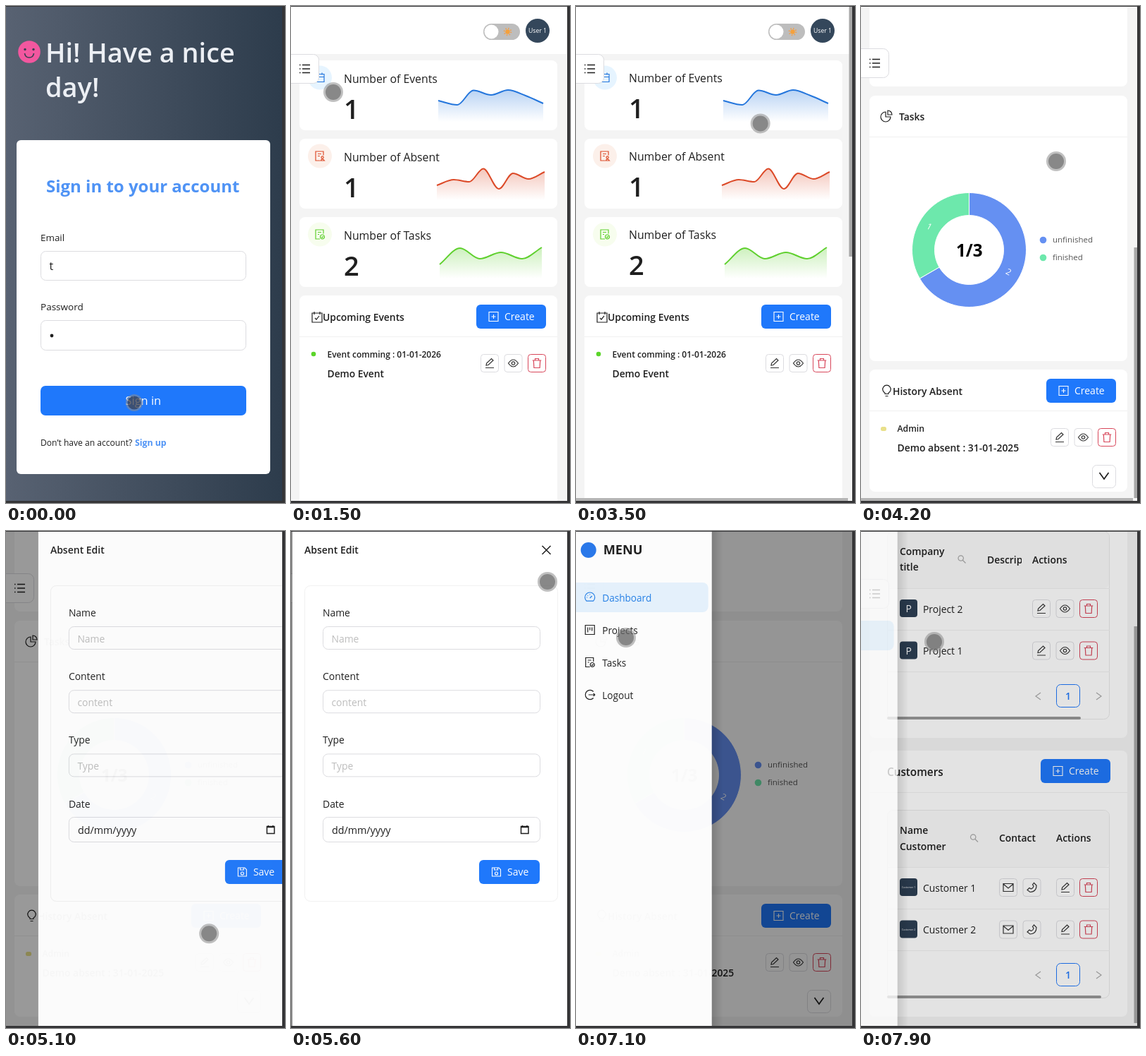
Recreate the animation shown at these times as an HTML page. Size 396x704 px, loop 8 s.

```html
<!DOCTYPE html>
<html lang="en">
<head>
<meta charset="utf-8">
<title>Dashboard walkthrough</title>
<style>
html, body { margin: 0; width: 100%; height: 100%; overflow: hidden; background: #353537; }
svg { display: block; width: 396px; height: 704px; font-family: "Open Sans", "Noto Sans", sans-serif; }
text { white-space: pre; }
</style>
</head>
<body>
<svg id="stage" viewBox="0 0 396 704"></svg>
<script>
const BLUE = '#1f78fb', INK = '#1f1f1f', RED = '#d8465a', LINE = '#dcdce0';

const ICONS = {
  calendar: 'M-6-5h12v11h-12zM-6-1h12M-3-7v3M3-7v3',
  check: 'M-7-6h14v13h-14zM-4-8v4M4-8v4M-3 1l2 2 4-5',
  absent: 'M5-1V-6.5H-6V6.5H0M-3-3h5M-3 0h3M1 6.5q2.5-4 5.5 0zM2 2a1.6 1.6 0 1 0 3.2 0a1.6 1.6 0 1 0-3.2 0',
  task: 'M5-1V-6.5H-6V6.5H0M-3-3h5M-3 0h2M.5 3.5a3 3 0 1 0 6 0a3 3 0 1 0-6 0M2.3 3.5l1 1 1.6-2',
  plus: 'M-6.5-6.5h13v13h-13zM-3 0h6M0-3v6',
  pencil: 'M-6 6.5h12M-5 3l.6-3L2.5-6.5 5-4-2 2.5z',
  eye: 'M-7 0Q0-10 7 0Q0 10-7 0zM-2.2 0a2.2 2.2 0 1 0 4.4 0a2.2 2.2 0 1 0-4.4 0',
  trash: 'M-6.3-4h12.6M-2.5-4v-2.5h5v2.5M-4.7-4l.6 10.5h8.2l.6-10.5',
  list: 'M-7.5-5.5h1.5M-3.5-5.5h11M-7.5 0h1.5M-3.5 0h11M-7.5 5.5h1.5M-3.5 5.5h11',
  pie: 'M-1-6a7 7 0 1 0 7 7h-7zM2-8a6 6 0 0 1 6 6h-6z',
  bulb: 'M-2.5 4.5v-1.5a5.7 5.7 0 1 1 5 0v1.5zM-2 7.5h4',
  down: 'M-6.5-4.5L0 4.5 6.5-4.5',
  close: 'M-6-6L6 6M6-6L-6 6',
  save: 'M-6-6h9.5l2.5 2.5v9.5h-12zM-3-6v3h5v-3M-2 2a2 2 0 1 0 4 0a2 2 0 1 0-4 0',
  gauge: 'M-4.7 5.2a7 7 0 1 1 9.4 0zM0 1l3-3M-4.5 0h1M0-4.5v1M-3.2-3l.6.6',
  board: 'M-6.5-6.5h13v13h-13zM-3-3.5v7M0-3.5v4M3-3.5v5',
  logout: 'M5-4.5a6.6 6.6 0 1 0 0 9M-2 0h9M5-2l2 2-2 2',
  mail: 'M-7-5.5h14v11h-14zM-7-5L0 1 7-5',
  phone: 'M3-6.5l3.5 3.5q0 9-9 9.5l-4-3 3-3 2.5 1.5q3-1 3.5-4l-1.5-2z',
  search: 'M-5-1.5a3.7 3.7 0 1 0 7.4 0a3.7 3.7 0 1 0-7.4 0M1.5 1.5L5.5 5.5',
  prev: 'M3-5L-4 0 3 5',
  next: 'M-3-5L4 0-3 5',
  date: 'M-5-4.5h10.5v10h-10.5zM-5-3.5h10.5M-3-6v2M3.5-6v2'
};

const rect = (x, y, w, h, fill, r = 0, stroke = 'none') =>
  `<rect x="${x}" y="${y}" width="${w}" height="${h}" rx="${r}" fill="${fill}" stroke="${stroke}"/>`;
const box = (x, y, w, h, r = 6, stroke = LINE) => rect(x + .5, y + .5, w - 1, h - 1, '#fff', r, stroke);
const disc = (x, y, r, fill) => `<circle cx="${x}" cy="${y}" r="${r}" fill="${fill}"/>`;
const text = (x, y, str, size = 13.9, fill = INK, weight = 400, extra = '') =>
  `<text x="${x}" y="${y}" font-size="${size}" fill="${fill}" font-weight="${weight}" ${extra}>${str}</text>`;
const bold = (x, y, str, size = 13.9, fill = INK) => text(x, y, str, size, fill, 600);
const icon = (name, x, y, color = INK, width = 1.2) =>
  `<path transform="translate(${x} ${y})" d="${ICONS[name]}" fill="none" stroke="${color}" stroke-width="${width}"/>`;
const iconButton = (name, x, y, color = '#333') =>
  box(x - 13, y - 13, 26, 26, 4, color === RED ? RED : LINE) + icon(name, x, y, color);
const actions = (y, xs = [282, 315.5, 349]) =>
  iconButton('pencil', xs[0], y) + iconButton('eye', xs[1], y) + iconButton('trash', xs[2], y, RED);
const button = (x, y, w, label, name) =>
  rect(x, y, w, 34, BLUE, 6) + icon(name, x + 24.5, y + 17, '#fff', 1.1) + text(x + 40, y + 22, label, 14, '#fff');
const card = (y, h) => rect(12, y, 366, h, '#fff', 8);
const rule = (x, y, w) => rect(x, y, w, 1, '#f0f0f0');

// Smooth curve: flat at peaks and dips, sloped elsewhere
function curve(p) {
  const slope = (a, b) => (b[1] - a[1]) / (b[0] - a[0]);
  const m = p.map((q, i) => {
    const a = p[i - 1] || q, b = p[i + 1] || q;
    return p[i - 1] && p[i + 1] && (q[1] - a[1]) * (b[1] - q[1]) <= 0 ? 0 : slope(a, b);
  });
  return p.slice(1).reduce((d, q, i) => {
    const a = p[i], h = (q[0] - a[0]) / 3;
    return d + `C${a[0] + h} ${a[1] + h * m[i]} ${q[0] - h} ${q[1] - h * m[i + 1]} ${q}`;
  }, 'M' + p[0]);
}

function statCard(i, label, value, name, color, tint, points) {
  const y = 77 + 111 * i, d = curve(points), base = y + 87;
  return card(y, 99) + disc(41, y + 24.5, 17, tint) + icon(name, 41, y + 24.5, color) +
    text(75, y + 31.5, label, 15.8) + bold(75, y + 82.5, value, 38) +
    `<linearGradient id="fade${i}" x2="0" y2="1"><stop stop-color="${color}" stop-opacity=".32"/>
     <stop offset="1" stop-color="${color}" stop-opacity="0"/></linearGradient>
     <g clip-path="url(#reveal)"><path d="${d}V${base}H${points[0][0]}Z" fill="url(#fade${i})"/>
     <path d="${d}" fill="none" stroke="${color}" stroke-width="2"/></g>`;
}

function ring(from, to, fill) {
  const at = (r, deg) => {
    const a = deg * Math.PI / 180;
    return [153.5 + r * Math.sin(a), 345.5 - r * Math.cos(a)];
  };
  const big = to - from > 180 ? 1 : 0;
  return `<path d="M${at(81, from)}A81 81 0 ${big} 1 ${at(81, to)}L${at(49, to)}A49 49 0 ${big} 0 ${at(49, from)}Z" fill="${fill}" stroke="#fff"/>`;
}

const field = (x, y, w, h) => box(x, y, w, h, 7);

const login = () =>
  rect(0, 0, 392, 704, 'url(#night)') + disc(33, 65, 15.8, '#f2579f') +
  disc(27, 61.5, 1.7, '#3a3f52') + disc(39, 61.5, 1.7, '#3a3f52') +
  '<path d="M26.5 67q.8 6 6.5 6t6.5-6" fill="none" stroke="#3a3f52" stroke-width="1.7"/>' +
  bold(56, 80, 'Hi! Have a nice', 37.9, '#eceff4') + bold(56, 129, 'day!', 37.9, '#eceff4') +
  rect(15, 190, 360, 473, '#fff', 6) +
  text(57, 264, 'Sign in to your account', 24, '#4f93f5', 700) +
  text(49, 333, 'Email', 13.4) + field(49, 347, 292, 42) + text(61.5, 374, 't', 16) +
  text(49, 431, 'Password', 13.5) + field(49, 445, 292, 43) + disc(65, 467, 2.4, INK) +
  rect(49, 538, 292, 42, BLUE, 7) + text(169.5, 565, 'Sign in', 16.4, '#fff') +
  text(49, 623, 'Don’t have an account?', 12.1) + text(183, 623, 'Sign up', 12.3, '#4f93f5', 700);

const dashboard = () =>
  rect(0, 0, 392, 1400, '#f4f4f4') + rect(0, 0, 392, 68, '#fff') +
  rect(273, 25, 52, 23, '#bdbdbd', 11.5) + disc(284.5, 36.5, 10, '#fff') +
  disc(307.5, 36.5, 3.2, '#f5a13c') +
  '<circle cx="307.5" cy="36.5" r="4.8" fill="none" stroke="#f0a050" stroke-width="2" stroke-dasharray="1.5 2.27"/>' +
  disc(350, 35, 17, '#34475b') + text(350, 38, 'User 1', 8.7, '#fff', 400, 'text-anchor="middle"') +
  statCard(0, 'Number of Events', 1, 'calendar', '#2476dc', '#e6f4ff',
    [[209, 134], [236, 140], [259, 119.5], [284, 126], [308, 119], [333, 127], [358, 138]]) +
  statCard(1, 'Number of Absent', 1, 'absent', '#dc4a28', '#fcf0ea',
    [[207, 254], [231, 246], [253, 249], [273, 230.5], [295, 259], [315, 237], [337, 245], [360, 235]]) +
  statCard(2, 'Number of Tasks', 2, 'task', '#5fd02e', '#f7fdee',
    [[211, 366], [240, 343], [268, 358], [298, 349], [328, 358], [356, 342]]) +
  card(410, 375) + rule(12, 468, 366) + icon('check', 37, 441) + bold(45, 446, 'Upcoming Events') +
  button(263, 423, 99, 'Create', 'plus') + disc(32, 493, 3.3, '#5bd52a') +
  bold(51.5, 498, 'Event comming : 01-01-2026', 12) + bold(51.5, 526, 'Demo Event', 13.8) + actions(506) +
  '<g transform="translate(0 671)">' +
  card(127, 376) + rule(12, 185, 366) + icon('pie', 36, 156) + bold(54, 162, 'Tasks') +
  ring(0, 240, '#6590f2') + ring(240, 360, '#6de8ac') +
  text(135, 355, '1/3', 24.2, '#000', 700) +
  text(206, 381, '2', 12, '#fff', 400, 'transform="rotate(28 210 377)"') +
  text(94, 317, '1', 12, '#fff', 400, 'transform="rotate(28 98 312)"') +
  disc(258.5, 331.5, 4.8, '#6590f2') + text(272, 335, 'unfinished', 11.5, '#555') +
  disc(258.5, 356.5, 4.8, '#6de8ac') + text(272, 360, 'finished', 11.5, '#555') +
  card(515, 173) + rule(12, 573, 366) + icon('bulb', 36.5, 545) + bold(45, 551, 'History Absent') +
  button(263, 528, 99, 'Create', 'plus') + rect(28, 596, 8, 6, '#e9e08a', 2.5) +
  bold(51.5, 603, 'Admin', 12.2) + bold(51.5, 631, 'Demo absent : 31-01-2025') + actions(611) +
  box(328, 650, 34, 33) + icon('down', 345, 665.5, INK, 1.7) + '</g>';

const table = (y, h, thumb) =>
  box(37, y, 316, h, 8, '#e8e8e8') + rect(38, y + 1, 314, 80, '#fafafa', 7) +
  [81, 140, 199].map(d => rule(37, y + d, 316)).join('') +
  icon('prev', 252, y + 234, '#aaa') + icon('next', 337, y + 234, '#aaa') +
  box(277, y + 217, 34, 33, 6, BLUE) + bold(290, y + 239, '1', 13.9, BLUE) +
  rect(37, y + 263, thumb, 4, '#999', 2);

const projects = () =>
  rect(0, 0, 392, 704, '#f4f4f4') + card(-40, 333) + table(0, 267, 275) +
  bold(55, 34, 'Company') + bold(55, 56, 'title') + icon('search', 143, 40, '#aaa') +
  `<g clip-path="url(#column)">${bold(179, 46, 'Description')}</g>` + bold(243, 46, 'Actions') +
  [2, 1].map((n, i) => {
    const y = 110 + 59.5 * i;
    return rect(55, y - 13, 25, 25, '#2d3f53', 4) + text(63.5, y + 5, 'P', 13.9, '#fff') +
      text(88, y + 5.5, 'Project ' + n) + actions(y, [256, 289.5, 323]);
  }).join('') +
  card(311, 377) + rule(12, 370, 366) + bold(37, 346.5, 'Customers', 15.3) +
  button(255, 323, 99, 'Create', 'plus') + table(395, 267, 304) +
  bold(55, 429, 'Name') + bold(55, 451.5, 'Customer') + icon('search', 160.5, 435, '#aaa') +
  bold(196, 440, 'Contact') + bold(277, 440, 'Actions') +
  [1, 2].map((n, i) => {
    const y = 505 + 59.5 * i;
    return rect(55, y - 13, 25, 25, '#2d3f53', 4) +
      text(67.5, y + 1, 'Customer ' + n, 3.6, '#fff', 400, 'text-anchor="middle"') +
      text(88, y + 5.5, 'Customer ' + n) + iconButton('mail', 209, y) + iconButton('phone', 242.5, y) +
      iconButton('pencil', 290, y) + iconButton('trash', 323, y, RED);
  }).join('');

const menu = active =>
  rect(208, -20, 16, 760, 'url(#shade)') + rect(0, -20, 208, 760, '#fff') +
  disc(33, 35, 11, '#2878ec') + text(54, 41, 'MENU', 18.2, INK, 700) +
  rect(2, 81 + 46 * active, 201, 42, '#e6f3fe', 8) +
  [['gauge', 'Dashboard'], ['board', 'Projects'], ['task', 'Tasks'], ['logout', 'Logout']].map(([name, label], i) => {
    const color = i === active ? '#2580e8' : INK;
    return icon(name, 35, 102 + 46 * i, color) + text(52.5, 107.5 + 46 * i, label, 13.6, color);
  }).join('');

const editForm = () =>
  rect(2, 0, 392, 704, '#fff') + bold(19, 32, 'Absent Edit', 14) + icon('close', 362.5, 27, INK, 1.5) +
  box(19, 77, 360, 448, 8, '#f1f1f1') +
  [['Name', 'Name'], ['Content', 'content'], ['Type', 'Type']].map(([label, hint], i) => {
    const y = 90.2 * i;
    return text(45, 121 + y, label) + field(45, 135 + y, 309, 33) + text(57.5, 158 + y, hint, 13.9, '#bdbdbd');
  }).join('') +
  text(45, 392, 'Date') + field(45, 405, 309, 36) + text(58, 429, 'dd/mm/yyyy', 14.3) +
  icon('date', 331.5, 423, INK, 1.5) + button(267, 466, 86, 'Save', 'save');

const stage = document.getElementById('stage');
stage.innerHTML = `
<defs>
  <linearGradient id="night"><stop stop-color="#586272"/><stop offset="1" stop-color="#2d3c4c"/></linearGradient>
  <linearGradient id="shade"><stop stop-opacity=".16"/><stop offset="1" stop-opacity="0"/></linearGradient>
  <clipPath id="view"><rect y="1" width="392" height="700"/></clipPath>
  <clipPath id="reveal"><rect id="revealBox" x="205" width="0" height="420"/></clipPath>
  <clipPath id="column"><rect x="170" y="20" width="58" height="40"/></clipPath>
</defs>
${rect(0, 0, 396, 704, '#353537')}
<g clip-path="url(#view)">
  <g id="login">${login()}</g>
  <g id="dashboard">${dashboard()}</g>
  <g id="projects">${projects()}</g>
  <g id="bars">${rect(387.5, 0, 4.5, 355, '#a8a8a8')}</g>
  <g id="sideBar">${rect(0, 697, 386, 4, '#b4b4b4')}</g>
  <g id="opener">${box(-10, 68, 50, 42, 8)}${icon('list', 19.5, 89, INK, 1.5)}</g>
  <rect id="mask" width="392" height="704"/>
  <g id="menuHome">${menu(0)}</g>
  <g id="menuProjects">${menu(1)}</g>
  <g id="edit">${editForm()}</g>
  <g id="cursor">${disc(0, 0, 14, 'rgba(140,140,140,.55)')}<circle id="core" r="11" fill="#505050" fill-opacity=".5"/></g>
</g>`;

const el = Object.fromEntries([...stage.querySelectorAll('[id]')].map(n => [n.id, n]));
const show = (node, on) => node.style.display = on ? '' : 'none';
const move = (node, x, y) => node.setAttribute('transform', `translate(${x} ${y})`);
const span = (t, from, length) => Math.min(1, Math.max(0, (t - from) / length));
const smooth = k => k * k * (3 - 2 * k);

// cubic-bezier(.25, .1, .25, 1)
function ease(x) {
  let a = 0, b = 1, s = .5;
  for (let i = 0; i < 20; i++) {
    s = (a + b) / 2;
    const v = .75 * s * (1 - s) + s ** 3;
    v < x ? a = s : b = s;
  }
  return .3 * s * (1 - s) ** 2 + 3 * s * s * (1 - s) + s ** 3;
}
const openness = (t, open, close) => ease(span(t, open, 300)) - ease(span(t, close, 300));

const PATH = [[0, 182, 562], [400, 182, 562], [1500, 60, 122], [1750, 24, 92], [2100, 24, 92], [3000, 261, 164],
  [3400, 261, 164], [4200, 277, 220], [4750, 282, 611], [5000, 282, 611], [5600, 364, 72], [5750, 362, 28],
  [6000, 362, 28], [6550, 349, 618], [6600, 349, 618], [6800, 25, 78], [6920, 25, 78], [7100, 71, 151],
  [7650, 80, 149], [7900, 104, 157], [8000, 108, 158]];
const PRESSES = [0, 1800, 3050, 4850, 5850, 6830, 7600];

function draw(t) {
  const onLogin = t < 400, onProjects = t >= 7700;
  const menuOpen = openness(t, 1900, 3100) + openness(t, 6900, 7765);
  const editOpen = openness(t, 4920, 5900);
  const scroll = smooth(span(t, 3500, 600));
  const lift = onProjects ? 0 : -8 * scroll;

  show(el.login, onLogin);
  show(el.dashboard, !onLogin && !onProjects);
  show(el.projects, onProjects);
  show(el.opener, !onLogin);
  move(el.dashboard, 0, -671 * scroll);
  move(el.opener, 0, lift);
  el.revealBox.setAttribute('width', 165 * smooth(span(t, 450, 850)));

  const scrolling = t >= 3500 && t < 4800;
  show(el.bars, scrolling || onProjects);
  show(el.sideBar, scrolling);
  el.bars.setAttribute('transform', onProjects ? 'translate(0 135) scale(1 1.583)' : `translate(0 ${342 * scroll})`);

  el.mask.setAttribute('opacity', .45 * Math.max(menuOpen, editOpen));
  show(el.menuHome, menuOpen > .001 && t < 7600);
  show(el.menuProjects, menuOpen > .001 && t >= 7600);
  for (const panel of [el.menuHome, el.menuProjects]) {
    move(panel, 208 * (menuOpen - 1), lift);
    panel.setAttribute('opacity', .7 + .3 * menuOpen);
  }
  show(el.edit, editOpen > .001);
  move(el.edit, 390 * (1 - editOpen), 0);
  el.edit.setAttribute('opacity', .7 + .3 * editOpen);

  const i = PATH.findIndex(p => p[0] > t), [t0, x0, y0] = PATH[i - 1], [t1, x1, y1] = PATH[i];
  const k = smooth((t - t0) / (t1 - t0));
  const pressed = PRESSES.some(p => t >= p && t < p + 100);
  el.cursor.setAttribute('transform',
    `translate(${x0 + (x1 - x0) * k} ${y0 + (y1 - y0) * k}) scale(${pressed ? .86 : 1})`);
  el.core.setAttribute('fill', pressed ? '#1c1c28' : '#505050');
}

function frame() {
  draw(performance.now() % 8000);
  requestAnimationFrame(frame);
}
frame();
</script>
</body>
</html>
```
